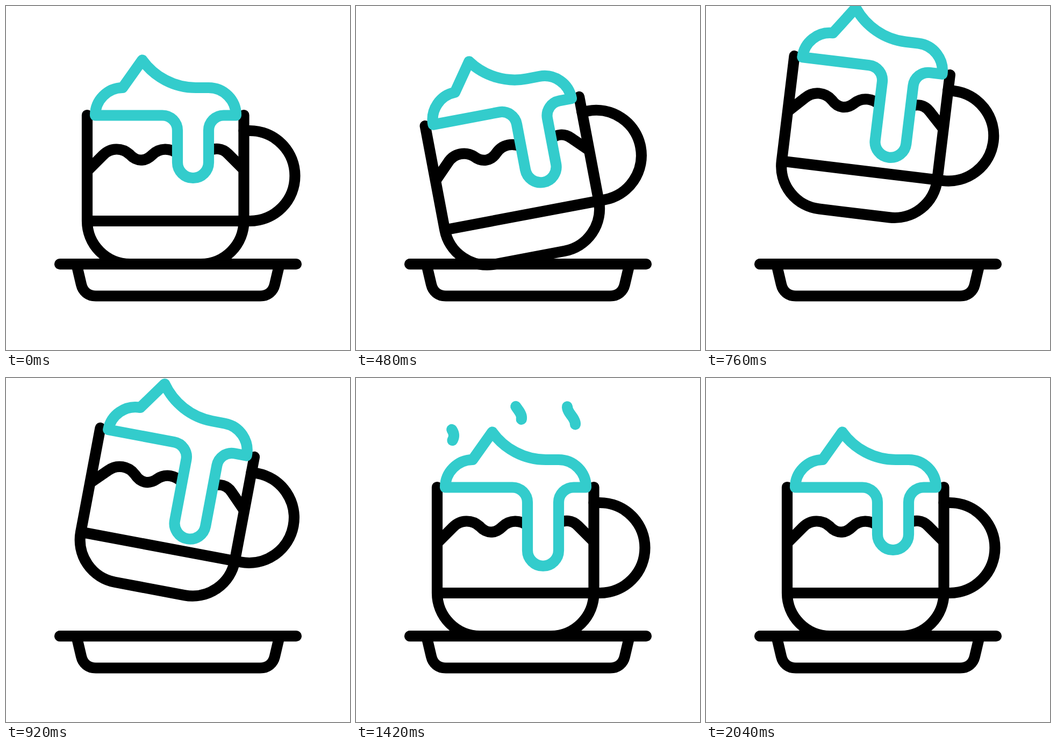
An HTML page that plays this animation: 640 by 640 pixels, repeating every 2140 ms.

```html
<!DOCTYPE html>
<html lang="en">
<head>
<meta charset="utf-8">
<title>Jumping cup</title>
<style>
  html, body { margin: 0; width: 100%; height: 100%; overflow: hidden; background: #fff; }
  svg { display: block; width: 100vw; height: 100vh; }
  path { fill: none; stroke: #000; stroke-width: 20.2; stroke-linecap: round; stroke-linejoin: round; }
  .teal { stroke: #33cccc; }
  #cream { fill: #fff; }
  .flat { stroke-linecap: butt; }
</style>
</head>
<body>
<svg viewBox="0 0 640 640">
  <path d="M100 480.2H540"/>
  <path class="flat" d="M132 484L140 518C143 531 153 539.5 167 539.5H473C487 539.5 497 531 500 518L508 484"/>
  <g id="cup">
    <path d="M151 203V400A80 80 0 0 0 231 480H362.5A80 80 0 0 0 442.5 400V203M151 400H442.5"/>
    <path d="M442.5 232H453.5A84 84 0 0 1 453.5 400H442.5"/>
    <path class="flat" d="M152 306L180 278C194 263 216 263 230 276C243 290 259 290 272 277C286 263 306 264 320 275M377 270C388 264 402 264 413 275L441 303"/>
    <path id="cream" class="teal"/>
  </g>
  <g id="steam"></g>
</svg>
<script>
  const LOOP = 2140, STEP = 20;
  const JUMP = 480, APEX = 800, LAND = 1148;
  const cup = document.getElementById('cup');
  const cream = document.getElementById('cream');
  const steam = document.getElementById('steam');

  const easeIn = u => u * u;
  const easeOut = u => u * (2 - u);
  const easeInOut = u => u < 0.5 ? 2 * u * u : 1 - 2 * (1 - u) ** 2;
  const sine = u => (1 - Math.cos(Math.PI * u)) / 2;

  // Progress from 0 to 1 between two times.
  const span = (t, from, to, ease) => ease(Math.min(1, Math.max(0, (t - from) / (to - from))));

  // Lean back, swing forward in the air, straighten on landing.
  const tilt = t => -10.7 * span(t, 0, 485, easeOut)
    + 21.6 * span(t, 485, 880, easeInOut) - 10.9 * span(t, 880, LAND, easeIn);

  // Rise with the lean, then leap and fall.
  const lift = t => -13.4 * span(t, 0, JUMP, easeOut)
    - 78.4 * span(t, JUMP, APEX, easeOut) + 91.8 * span(t, APEX, LAND, easeIn);

  const drift = t => -5 * (span(t, 0, 570, easeIn) - span(t, 570, 900, easeInOut));
  const drip = t => 56.5 * (span(t, 0, 990, sine) - span(t, 990, 1880, sine));

  // Wavy wisps climb at one speed from base to top.
  const SPEED = 0.19;
  const wisps = [
    { x: 174.5, crest: 107, base: 125, top: 50, start: 1267, length: 20 },
    { x: 300.5, crest: 74, base: 100, top: -20, start: 1172, length: 24 },
    { x: 400.5, crest: 86, base: 105, top: 38, start: LAND, length: 33 }
  ];

  for (const wisp of wisps) {
    wisp.path = document.createElementNS('http://www.w3.org/2000/svg', 'path');
    wisp.path.setAttribute('class', 'teal');
    steam.append(wisp.path);
  }

  function creamShape(drop) {
    const low = 291 + drop;
    return 'M166 203.5A51.5 51.5 0 0 1 217 152L253.5 100.5C276 132 313 152 353 152' +
      'H377A51 51 0 0 1 428 203.5H405A28 28 0 0 0 377 231.5' +
      `V${low}A29 29 0 0 1 319 ${low}V231.5A28 28 0 0 0 291 203.5Z`;
  }

  function wispShape({ x, crest, base, top, start, length }, t) {
    const y = base - SPEED * (t - start);
    const head = Math.max(top, y), tail = Math.min(base, y + length);
    if (tail - head < 1) return '';
    const n = 12, points = [];
    for (let i = 0; i <= n; i++) {
      const py = head + (tail - head) * i / n;
      const px = x + 7.5 * Math.cos(Math.PI * (py - crest) / 33);
      points.push(px.toFixed(2) + ' ' + py.toFixed(2));
    }
    return 'M' + points.join('L');
  }

  function draw(now) {
    const t = Math.floor((now % LOOP) / STEP) * STEP;
    cup.setAttribute('transform',
      `translate(${drift(t)} ${lift(t)}) rotate(${tilt(t)} 320 320)`);
    cream.setAttribute('d', creamShape(drip(t)));
    for (const wisp of wisps) wisp.path.setAttribute('d', wispShape(wisp, t));
  }

  const begin = performance.now();
  function tick() {
    draw(performance.now() - begin);
    requestAnimationFrame(tick);
  }
  tick();
</script>
</body>
</html>
```
